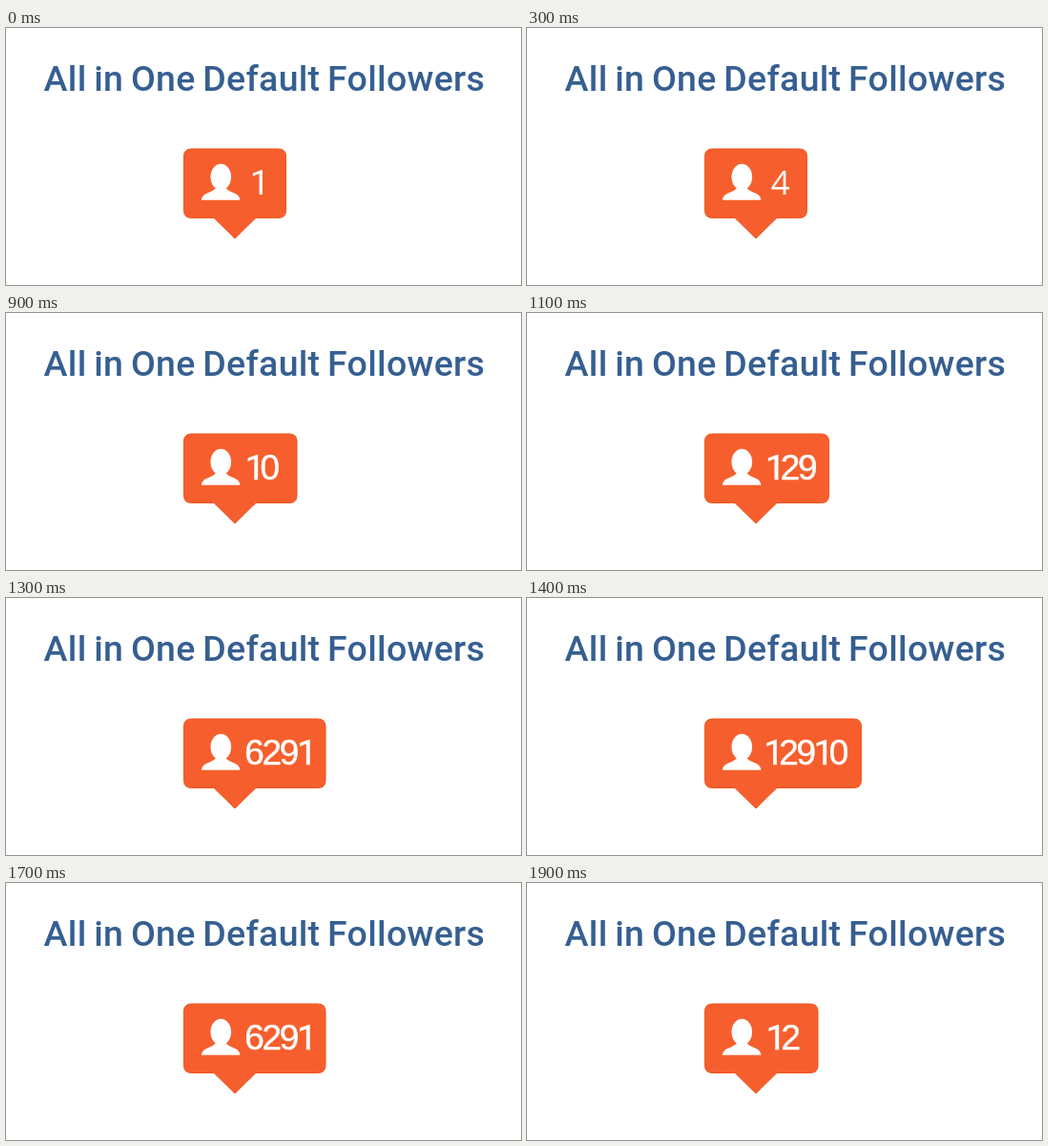
Recreate the animation shown at these times as an HTML page. Size 540 by 270 pixels, loop 2 s.

```html
<!DOCTYPE html>
<html lang="en">
<head>
<meta charset="utf-8">
<style>
  html, body { margin: 0; width: 100%; height: 100%; overflow: hidden; background: #fff; }
  svg { display: block; width: 540px; height: 270px; }
  .title { font: 500 37.5px Roboto, sans-serif; letter-spacing: .27px; word-spacing: -1.9px; fill: #365f91; }
  .count { font: 37px "Liberation Sans", sans-serif; letter-spacing: -2.3px; fill: #fff; }
  .count.long { stroke: #fff; stroke-width: .5px; }
  .one { font-family: Roboto, sans-serif; letter-spacing: -5px; }
  .four { font: 35px "Open Sans", sans-serif; }
  .badge { fill: #f65f2d; stroke: #ef551f; }
  .person { fill: #fff; }
</style>
</head>
<body>
<svg viewBox="0 0 540 270">
  <text class="title" x="39.6" y="66">All in One Default Followers</text>
  <path class="badge" id="badge"/>
  <g class="person">
    <ellipse cx="225.3" cy="156.5" rx="10.8" ry="13.8"/>
    <path d="M220 164V168Q219 170.5 210 174Q205 176.5 205 180.7H245.3Q245.3 176.5 240.5 174Q231.5 170.5 230.5 168V164Z"/>
  </g>
  <text id="count" y="175.3"></text>
</svg>
<script>
  const LOOP = 2000, STEP = 100;
  const counts = [1, 2, 3, 4, 5, 6, 7, 8, 9, 10,
                  12, 129, 1291, 6291, 12910, 62910, 99999, 6291, 129, 12];
  // Badge right edge and text start, by number of digits
  const rightEdge = [0, 293.5, 305, 316.5, 335, 350.5];
  const textStart = [0, 255.7, 250.8, 250, 250.3, 248.5];
  const badge = document.getElementById('badge');
  const count = document.getElementById('count');
  const digitClass = { 1: 'one', 4: 'four' };
  let shown = -1;

  const badgePath = right =>
    `M194.5 127H${right - 8}q8 0 8 8V191.5q0 8-8 8H262L240 221L218 199.5
     H194.5q-8 0-8-8V135q0-8 8-8Z`;

  function show(step) {
    const digits = [...String(counts[step])];
    badge.setAttribute('d', badgePath(rightEdge[digits.length]));
    count.setAttribute('x', textStart[digits.length]);
    count.setAttribute('class', digits.length > 1 ? 'count long' : 'count');
    count.innerHTML = digits
      .map(d => `<tspan class="${digitClass[d] || ''}">${d}</tspan>`).join('');
  }

  function frame() {
    const step = Math.floor(performance.now() % LOOP / STEP);
    if (step !== shown) show(shown = step);
    requestAnimationFrame(frame);
  }
  frame();
</script>
</body>
</html>
```
